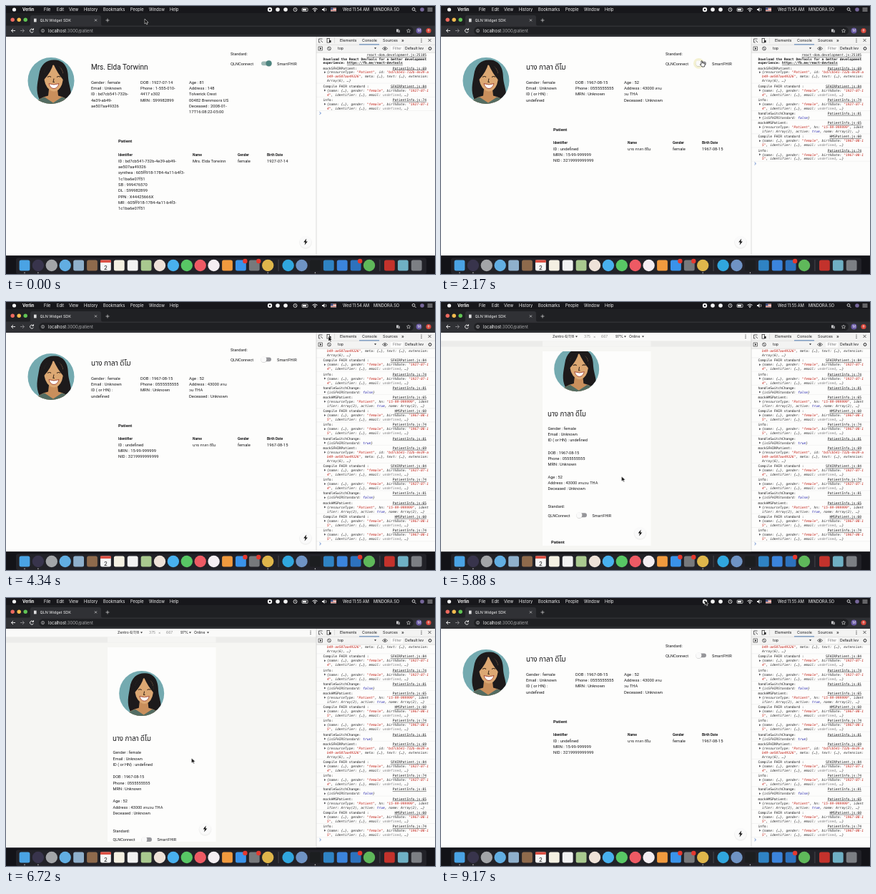
Animation of 600 by 375 pixels, one loop 9.24 s. Source, as an HTML page:

```html
<!DOCTYPE html>
<html lang="en">
<head>
<meta charset="utf-8">
<title>Patient widget</title>
<style>
html, body { margin: 0; width: 100%; height: 100%; overflow: hidden; background: #131318; }
svg { display: block; width: 100vw; height: 100vh; }
text { white-space: pre; font-family: Roboto, "Noto Sans Thai", "Noto Sans", sans-serif; fill: #18181a; }
.ui { font-family: Inter, sans-serif; }
.light { fill: #f6f6f6; }
.mono { font-family: "DejaVu Sans Mono", monospace; font-size: 4.63px; }
.obj { font-style: italic; fill: #2c2c2e; }
.str { fill: #c01a10; }
.word { fill: #1c1ca8; }
.undef { fill: #77777a; }
.b { font-weight: 700; }

.smart, .hms, .mobile, .log1, .log2, .log3, .prompt, .logs, .early, .late, .arrow, .hand, .halo {
  animation: 9240ms step-end infinite;
}
.smart { animation-name: smart; }
.hms { animation-name: hms; }
.mobile { animation-name: mobile; }
.log1 { animation-name: log1; }
.log2 { animation-name: log2; }
.log3 { animation-name: log3; }
.prompt { animation-name: prompt; }
.logs { animation-name: logs; }
.early { animation-name: early; }
.late { animation-name: late; }
.arrow { animation-name: arrow; }
.hand { animation-name: hand; }
.halo { animation-name: halo; }
.pointer { animation: pointer 9240ms linear infinite; }
.scroll { animation: scroll 9240ms linear infinite; }

@keyframes smart { 0%, 26.515% { visibility: visible } 12.879%, 40.152%, to { visibility: hidden } }
@keyframes hms { 0%, 26.515%, 49.242% { visibility: hidden } 12.879%, 40.152%, 83.333%, to { visibility: visible } }
@keyframes mobile { 0%, 83.333%, to { visibility: hidden } 49.242% { visibility: visible } }
@keyframes log1 { 0% { visibility: hidden } 12.879%, to { visibility: visible } }
@keyframes log2 { 0% { visibility: hidden } 26.515%, to { visibility: visible } }
@keyframes log3 { 0% { visibility: hidden } 40.152%, to { visibility: visible } }
@keyframes prompt {
  0% { transform: translateY(150px) } 12.879% { transform: translateY(220.5px) }
  26.515% { transform: translateY(297.5px) } 40.152%, to { transform: translateY(368.5px) }
}
@keyframes logs { 0% { transform: none } 40.152%, to { transform: translateY(-30.2px) } }
@keyframes early { 0% { visibility: visible } 55.303%, to { visibility: hidden } }
@keyframes late { 0% { visibility: hidden } 55.303%, to { visibility: visible } }
@keyframes arrow { 0%, 42.4%, to { visibility: visible } 10.2% { visibility: hidden } }
@keyframes hand { 0%, 42.4%, to { visibility: hidden } 10.2% { visibility: visible } }
@keyframes halo { 0%, 42.4%, to { opacity: 0 } 10.2% { opacity: 1 } }
@keyframes pointer {
  0%, 3.8% { transform: translate(194px, 18px) }
  10.6%, 41.7% { transform: translate(364px, 77px) }
  46.2%, 49.5% { transform: translate(451px, 48px) }
  53.5%, 63.64% { transform: translate(252.5px, 244px) }
  72.7%, 76% { transform: translate(259.5px, 224px) }
  81%, 84.5% { transform: translate(451px, 48px) }
  95%, to { transform: translate(369px, 3px) }
}
@keyframes scroll {
  0%, 54.1% { transform: none } 59.1% { transform: translateY(-150px) }
  63.64% { transform: translateY(-40px) } 64.9%, to { transform: none }
}
</style>
</head>
<body>
<svg id="stage" viewBox="0 0 600 375" preserveAspectRatio="none"></svg>
<script>
const PAPER = '#fdfdfc', INK = '#222224', PALE = '#f3f3f2', LIGHT = '#f4f4f4';
const STRIP = '#1f2023', TOOLBAR = '#303135', MENU = '#17171b';
const TOP = 43, BOTTOM = 349.4;

const rect = (x, y, w, h, fill, extra = '') =>
  `<rect x="${x}" y="${y}" width="${w}" height="${h}" fill="${fill}" ${extra}/>`;
const dot = (x, y, r, fill, extra = '') =>
  `<circle cx="${x}" cy="${y}" r="${r}" fill="${fill}" ${extra}/>`;
const line = (d, stroke, width = .7) =>
  `<path d="${d}" fill="none" stroke="${stroke}" stroke-width="${width}"/>`;
const text = (x, y, size, value, cls = '', extra = '') =>
  `<text x="${x}" y="${y}" font-size="${size}" class="${cls}" ${extra}>${value}</text>`;
const lines = (x, y, values, size = 5.83, step = 8.35) =>
  values.map((value, i) => text(x, y + i * step, size, value)).join('');
const group = (cls, ...parts) => `<g class="${cls}">${parts.join('')}</g>`;

function menuBar() {
  const items = [[53, 'File'], [71, 'Edit'], [88, 'View'], [109, 'History'],
    [136, 'Bookmarks'], [174, 'People'], [200, 'Window'], [229, 'Help']];
  const clock = (cls, time) => group(cls, text(471, 7.2, 5.6, `Wed ${time} AM`, 'ui light'));
  return rect(0, 0, 600, 10, MENU) + dot(11.5, 5, 2.6, LIGHT) +
    text(23, 7.2, 5.7, 'Verlin', 'ui light b') +
    items.map(([x, name]) => text(x, 7.2, 5.7, name, 'ui light')).join('') +
    dot(369, 5, 3.2, LIGHT) + dot(369, 5, 1.2, MENU) + dot(380, 5, 2.8, LIGHT) +
    dot(391, 5, 2.8, LIGHT) +
    dot(404.5, 5, 2.5, 'none', `stroke="${LIGHT}" stroke-width=".8"`) +
    line('M404.5 3.3v1.9l1.3.8', LIGHT, .6) +
    rect(414, 3, 8, 4.4, 'none', `stroke="${LIGHT}" stroke-width=".7" rx="1"`) +
    rect(415, 4, 5, 2.4, LIGHT) +
    line('M428.5 4.4q3.5-3 7 0M430 6q2-1.8 4 0', LIGHT, 1) + dot(432, 7.4, .8, LIGHT) +
    `<path d="M442 4h1.5l2-2v6l-2-2H442z" fill="${LIGHT}"/>` + line('M447 3q2 2 0 4', LIGHT) +
    rect(454, 2.5, 8, 5, '#e9e2e2') + rect(454, 2.5, 3.5, 2.7, '#37477d') +
    line('M457.5 3.7h4.5M454 6.3h8', '#c5483e', .8) +
    clock('early', '11:54') + clock('late', '11:55') +
    text(514, 7.2, 5.6, 'MINDORA.SO', 'ui light') +
    dot(570, 4.4, 1.9, 'none', `stroke="${LIGHT}" stroke-width=".8"`) +
    line('M571.5 6l2 2', LIGHT, .8) + dot(582, 5, 2.8, '#76679a') +
    line('M589.5 3h7M589.5 5h7M589.5 7h7', LIGHT);
}

function browserBar() {
  return rect(0, 10, 600, 18, STRIP) +
    ['#ee6a5f', '#f5bd4f', '#61c454'].map((c, i) => dot(9.2 + i * 9, 19.3, 2.7, c)).join('') +
    `<path d="M31 28q3 0 3-3v-9q0-3 3-3h93q3 0 3 3v9q0 3 3 3z" fill="${TOOLBAR}"/>` +
    rect(39, 17.6, 3.6, 4.8, '#dededf') + text(47.5, 22, 5.4, 'QLN Widget SDK', 'ui light') +
    line('M124 18.4l3 3m0-3l-3 3M139.5 20h5m-2.5-2.5v5', '#dcdcdc') +
    rect(0, 27.5, 600, TOP - 27.5, TOOLBAR) +
    line('M13 34.5H7.5m2.5-2.5l-2.5 2.5 2.5 2.5', LIGHT, .9) +
    line('M20 34.5h5.5m-2.5-2.5l2.5 2.5-2.5 2.5', '#8b8b8e', .9) +
    line('M38 33a2.5 2.5 0 1 0 .4 2.5M38.5 31.2v2.2h-2.2', LIGHT, .9) +
    rect(46, 29, 524, 11.3, STRIP, 'rx="5.6"') +
    dot(51.5, 34.6, 2.1, 'none', 'stroke="#c9c9cb" stroke-width=".7"') +
    line('M51.5 34.2v1.6M51.5 33v.6', '#c9c9cb', .7) +
    text(59, 36.6, 5.9, 'localhost<tspan fill="#a9a9ab">:3000/patient</tspan>', 'ui light') +
    rect(546, 32.4, 3.2, 4, '#c9c9cb') + rect(548, 33.6, 3, 3.6, '#8e8e92') +
    line('M563 32l.8 1.7 1.8.2-1.3 1.2.4 1.9-1.7-1-1.7 1 .4-1.9-1.3-1.2 1.8-.2z', '#dcdcdc', .6) +
    dot(577.5, 34.5, 4, '#6a5aa6') + text(575.6, 36.4, 5, 'M', 'ui light') +
    dot(591, 34.5, 3.6, '#d8453a') + line('M591 36.4v-3.6m-1.5 1.5l1.5-1.5 1.5 1.5', LIGHT);
}

// Portrait drawn in a 65-unit circle around its own centre.
function portrait(x, y, scale) {
  return `<g transform="translate(${x} ${y}) scale(${scale})" clip-path="url(#round)">
    ${rect(-33, -33, 66, 66, '#74aab0')}
    <path d="M-16 27C-22 14-19 4-17-8-15-24-5-30 6-29 20-28 24-16 24-4 25 9 31 16 26 30Z" fill="#1d1a1b"/>
    <path d="M-24 34Q-18 24-4 21L-3 12H9L10 21Q24 24 29 34Z" fill="#c98f5c"/>
    <path d="M-24 34Q-18 25-9 23L3 31 15 23Q25 25 29 34Z" fill="#536c62"/>
    <path d="M-10-8Q-9-21 4-22 17-20 17-7 17 7 10 13 4 17-2 13-10 6-10-8Z" fill="#dca873"/>
    <path d="M-11 0Q-12-20 3-24 1-13-11 0ZM3-24Q18-21 18 0 9-10 3-24Z" fill="#1d1a1b"/>
    <path d="M-3 4Q4 7 11 4 9 11 4 11-1 11-3 4Z" fill="#fff" stroke="#a84e3c" stroke-width="1"/>
    <path d="M-5-5q3-2 5 0M8-5q3-2 5 0M4-3l-1 5h2" fill="none" stroke="#3d2b1d" stroke-width="1.1"/>
  </g>`;
}

function toggle(x, y, on) {
  const knob = on ? x + 3.6 : x - 3.6;
  return dot(knob, y, 7.4, on ? '#dfe9e6' : '#f4f1d2', 'class="halo"') +
    rect(x - 7, y - 2.9, 14, 5.8, on ? '#9db8b4' : '#96969a', 'rx="2.9"') +
    dot(knob, y + .5, 4.2, '#00000030') +
    dot(knob, y, 4, on ? '#4d8580' : '#fafafa');
}

function fab(x, y) {
  return dot(x, y + 1, 9, '#0000000c') + dot(x, y, 8, '#fafafa') +
    `<path d="M${x + 1.2} ${y - 4.4}l-4 5h2.4l-1 4 4.2-5.2h-2.4z" fill="#111"/>`;
}

const rowHeads = [[157, 'Identifier'], [261, 'Name'], [324, 'Gender'], [365, 'Birth Date']];

// The table sits below the tallest column of details.
function desktop(person, on) {
  const rows = Math.max(...person.columns.map(column => column.length));
  const table = 141.1 + rows * 8.37;
  return portrait(63, 104.5, 1) + text(119, 88.5, 10, person.name) +
    [119, 188, 256].map((x, i) => lines(x, 108.5, person.columns[i])).join('') +
    text(314, 69.3, 5.6, 'Standard:') + text(314, 82.5, 5.7, 'QLNConnect') +
    toggle(364, 80.3, on) + text(379, 82.5, 5.7, 'SmartFHIR') +
    text(157, table, 6, 'Patient', 'b') +
    rowHeads.map(([x, name]) => text(x, table + 18.5, 4.9, name, 'b')).join('') +
    lines(157, table + 27.2, person.ids) + text(261, table + 27.2, 5.83, person.name) +
    text(324, table + 27.2, 5.83, 'female') + text(365, table + 27.2, 5.83, person.born) + fab(419, 330);
}

function phone(person) {
  const size = 5.65, step = 8.2;
  const label = (x, value) => text(x, 50.4, 5.1, value, 'ui');
  const caret = x => `<path d="M${x} 47.6h3l-1.5 2z" fill="${INK}"/>`;
  const blocks = [
    ['Gender : female', 'Email : Unknown', 'ID ( or HN) : undefined'],
    person.columns[1],
    ['Age : 52', `Address : ${person.address}`, 'Deceased : Unknown']];
  return rect(0, 42, 434, BOTTOM - 42, '#f6f6f3') + rect(0, 42, 434, 12.5, '#fafaf9') +
    rect(0, 54.5, 434, 8, '#ececea') + rect(142, 54.5, 151.5, 8, '#f5f5f3') +
    label(156, 'Zentro 6/7/8') + caret(188) +
    `<g opacity=".5">${label(200, '375') + label(213, '×') + label(224, '667')}</g>` +
    label(244, '97%') + caret(256) + label(263, 'Online') + caret(281) +
    [46, 48.2, 50.4].map(y => dot(426, y, .6, INK)).join('') +
    rect(142, 69, 151.5, 272, PAPER) +
    `<g clip-path="url(#screen)">` + group('scroll',
      portrait(189.7, 133.5, .97), text(149, 199.5, 9.7, person.name),
      ...blocks.map((values, i) => lines(149.5, 218.4 + i * 34, values, size, step)),
      text(149.5, 327.8, 5.5, 'Standard:'), text(149.5, 340.3, 5.5, 'QLNConnect'),
      toggle(197, 338, false), text(211.5, 340.3, 5.5, 'SmartFHIR'),
      text(154, 378, 5.8, 'Patient', 'b'),
      text(154, 396, 4.8, 'Identifier', 'b'), text(254, 396, 4.8, 'Name', 'b'),
      lines(154, 405, person.ids, size, step), text(254, 405, size, person.name)) +
    fab(278.5, 323) + '</g>';
}

const mrs = {
  name: 'Mrs. Elda Torwinn', born: '1927-07-14',
  columns: [
    ['Gender : female', 'Email : Unknown', 'ID : bd7cb541-732b-', '4e39-ab49-', 'ae507aa49326'],
    ['DOB : 1927-07-14', 'Phone : 1-555-010-', '4417 x302', 'MRN : S99982899'],
    ['Age : 81', 'Address : 148', 'Tolverick Crest', '00482 Brenmoors US', 'Deceased : 2008-01-', '17T16:08:22-05:00']],
  ids: ['ID : bd7cb541-732b-4e39-ab49-', 'ae507aa49326', 'synthea : 605ff918-1784-4a11-b4f3-',
    '1c1ba6e07f51', 'SB : 999476570', 'DL : S99982899', 'PPN : X44425666X',
    'MR : 605ff918-1784-4a11-b4f3-', '1c1ba6e07f51']
};
const nang = {
  name: 'นาง กาลา ดีโม', born: '1967-08-15', address: '43000 ลานวน THA',
  columns: [
    ['Gender : female', 'Email : Unknown', 'ID ( or HN) :', 'undefined'],
    ['DOB : 1967-08-15', 'Phone : 0555555555', 'MRN : Unknown'],
    ['Age : 52', 'Address : 43000 ลาน', 'วน THA', 'Deceased : Unknown']],
  ids: ['ID : undefined', 'MRN : 15-99-999999', 'NID : 3219999999999']
};

function devtoolsBar() {
  const caret = x => `<path d="M${x} 58.3h3l-1.5 2z" fill="${INK}"/>`;
  return rect(434, 42, 166, 23.5, PALE) +
    line('M434 54.3h166M434 65.3h166', '#cfcfcf', .5) +
    line('M442.5 46h-5v5h2M440 48l3 3', INK) +
    rect(449, 45.5, 3.4, 5.6, 'none', `stroke="${INK}" stroke-width=".7"`) +
    rect(452, 48, 2.5, 3.1, INK) + line('M459.5 44v8', '#c8c8c8', .5) +
    text(467, 50.3, 5.4, 'Elements', 'ui') + text(498, 50.3, 5.4, 'Console', 'ui') +
    rect(494, 53.3, 28, 1.1, '#5b83b5') + text(527, 50.3, 5.4, 'Sources', 'ui') +
    text(553, 50.3, 6.5, '»', 'ui') + [46, 48.2, 50.4].map(y => dot(581, y, .6, INK)).join('') +
    line('M590.5 46l4 4m0-4l-4 4', INK) +
    rect(437, 57, 5.5, 5, 'none', `stroke="${INK}" stroke-width=".6"`) +
    `<path d="M439 58l2.4 1.5-2.4 1.5z" fill="${INK}"/>` +
    dot(452, 59.5, 2.4, 'none', `stroke="${INK}" stroke-width=".7"`) + line('M450.4 58l3.2 3', INK) +
    text(464, 61.3, 5.2, 'top', 'ui') + caret(515) +
    line('M526.5 59.5q3.5-4 7 0-3.5 4-7 0z', INK) + dot(530, 59.5, 1.1, INK) +
    rect(538, 56, 17, 7.6, PAPER) + text(541, 61.3, 5.2, 'Filter', 'ui undef') +
    text(558, 61.3, 5.2, 'Default lev', 'ui') +
    dot(593, 59.5, 1.9, 'none', `stroke="${INK}" stroke-width="1"`);
}

const paint = value => value
  .replace(/^[^" ]*"(?=,)|"[^"]*"?/g, s => `<tspan class='str'>${s}</tspan>`)
  .replace(/\b(true|false)\b/g, '<tspan class="word">$1</tspan>')
  .replace(/\bundefined\b/g, '<tspan class="undef">undefined</tspan>');

const ROW = 5.95;
const mono = (x, y, value, cls = '', extra = '') => text(x, y, 4.63, value, 'mono ' + cls, extra);
const link = (y, value) => mono(588, y, value, '', 'text-anchor="end" text-decoration="underline"');

function entries(start, list) {
  let y = start;
  return list.map(([title, file, ...body]) => {
    const base = y + 1.9;
    const out = mono(443.5, base, title) + link(base, file) +
      `<path d="M445 ${base + 2.8}l2.4 1.5-2.4 1.5z" fill="#55555a"/>` +
      body.map((row, i) => mono(449, base + (i + 1) * ROW, paint(row), 'obj')).join('');
    y += (body.length + 1) * ROW + 1.35;
    return out + line(`M434 ${y - 3.6}h166`, '#ebebeb', .5);
  }).join('');
}

function consoleLog() {
  const person = (a, b) => [`{name: {…}, gender: "female", birthDate: "${a}`, `${b}", identifier: {…}, email: undefined, …}`];
  const smart = [
    ['mockSFHIRPatient:', 'PatientInfo.js:69', '{resourceType: "Patient", id: "bd7cb541-732b-4e39-a',
      'b49-ae507aa49326", meta: {…}, text: {…}, extension:', 'Array(6), …}'],
    ['Compile FHIR standard :', 'SFHIRPatient.js:84', ...person('1927-07-1', '4')],
    ['info:', 'PatientInfo.js:74', ...person('1927-07-1', '4')]];
  const hms = [
    ['mockHMSPatient:', 'PatientInfo.js:65', '{resourceType: "Patient", hn: "15-99-999999", ident',
      'ifier: Array(2), active: true, name: Array(2), …}'],
    ['Compile FHIR standard :', 'HMSPatient.js:60', ...person('1967-08-1', '5')],
    ['info:', 'PatientInfo.js:74', ...person('1967-08-1', '5')]];
  const change = state => ['handleSwitchChange:', 'PatientInfo.js:81', `{isSFHIRStandard: ${state}}`];
  return `<g clip-path="url(#console)">` + group('logs',
    link(70.2, 'react-dom.development.js:25185'),
    mono(443.5, 75.5, 'Download the React DevTools for a better development', 'b'),
    mono(443.5, 81.4, 'experience: <tspan text-decoration="underline">https://fb.me/react-devtools</tspan>', 'b'),
    entries(86.6, smart),
    group('log1', entries(150, [change(false), ...hms])),
    group('log2', entries(220.9, [change(true), ...smart])),
    group('log3', entries(297.7, [change(false), ...hms])),
    group('prompt', line('M438.5-1.7l2 1.7-2 1.7', '#3a6ac0', .8))) + '</g>';
}

function dock() {
  const colors = ['#4aa3e4', '#38344c', '#a3a5a8', '#62aee2', '#8fb0cc', '#8e6a4c', '#f6f6f6', '#f4f0e2',
    '#f2f2f2', '#a9c98f', '#eee2d8', '#48b0ee', '#58c765', '#ee5a64', '#f4eef2', '#f19a3e', '#3a93ea',
    '#77797c', '#dfb64b', null, '#30a6de', '#6f93c4', '#1c1e20', '#2f83c4', '#3b84dc', '#2d72bd', '#5fb85a',
    null, '#c3322c', '#6fb0c4', '#7c7f84'];
  const round = [1, 2, 3, 10, 11, 12, 13, 14, 18, 20, 21, 26];
  const badges = [16, 17, 25];
  let x = 26, out = rect(0, BOTTOM, 600, 375 - BOTTOM, '#131318') + rect(14, 352.5, 574, 22.5, '#222228', 'rx="3"');
  colors.forEach((color, i) => {
    if (!color) { out += line(`M${x - 4} 355v16`, '#6a6a70', .5); x += 9.5; return; }
    out += round.includes(i) ? dot(x, 363, 8.2, color) : rect(x - 7.4, 355.4, 14.8, 15.2, color, 'rx="2.5"');
    if (i === 6) out += rect(x - 7.4, 355.4, 14.8, 3.6, '#dd5145') + text(x, 368.5, 8, '2', 'ui', 'text-anchor="middle"');
    if (badges.includes(i)) out += dot(x + 6, 357, 3.2, '#e5392f');
    if (i < 2 || i === 18 || i === 22) out += dot(x, 373.3, .7, '#e0e0e0');
    x += 18.9;
  });
  return out;
}

function pointer() {
  return group('pointer',
    group('arrow', `<path d="M0 0v7l1.7-1.5 1.1 2.5 1.2-.6-1.1-2.3h2.2z" fill="#0b0b0b" stroke="#fff" stroke-width=".5"/>`),
    group('hand', `<path d="M0 0q1-1 1.5.4V2.6l3 .7q1 .4.6 2L4.3 8H1L-1.6 4.8q0-1.2 1.6-.2z" fill="#fff" stroke="#0b0b0b" stroke-width=".7"/>`));
}

document.getElementById('stage').innerHTML = `<defs>
  <clipPath id="round"><circle r="32.5"/></clipPath>
  <clipPath id="screen">${rect(142, 69, 151.5, 272, '#fff')}</clipPath>
  <clipPath id="console">${rect(434, 65.5, 166, BOTTOM - 65.5, '#fff')}</clipPath></defs>` +
  rect(0, 42, 600, BOTTOM - 42, PAPER) +
  group('smart', desktop(mrs, true)) + group('hms', desktop(nang, false)) + group('mobile', phone(nang)) +
  consoleLog() + devtoolsBar() + line(`M434 42V${BOTTOM}`, '#cccccc', .7) +
  browserBar() + menuBar() + dock() + pointer();
</script>
</body>
</html>
```
